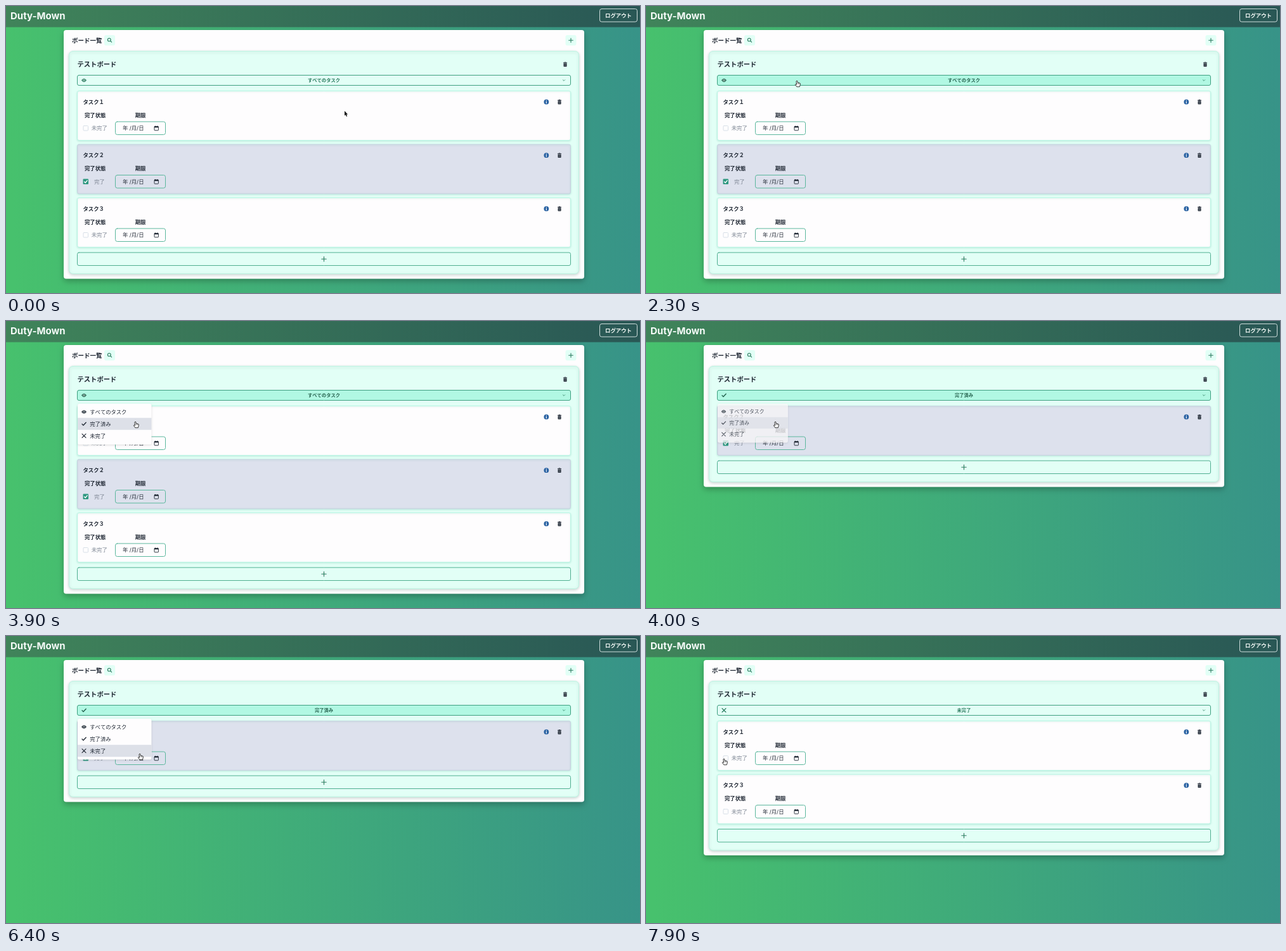
An HTML page with a canvas for the animation above (8000 ms loop, 1000x454 px).

```html
<!DOCTYPE html>
<html lang="ja">
<head>
<meta charset="utf-8">
<title>Task board</title>
<style>
html, body { margin: 0; width: 100%; height: 100%; overflow: hidden; background: #41ab78; }
canvas { display: block; width: 1000px; height: 454px; }
</style>
</head>
<body>
<canvas id="stage"></canvas>
<script>
const W = 1000, H = 454, LOOP = 8000, STEP = 100;
const canvas = document.getElementById('stage');
const ctx = canvas.getContext('2d');
const dpr = window.devicePixelRatio || 1;
canvas.width = W * dpr;
canvas.height = H * dpr;

const INK = '#1f2733', GREEN = '#2a7a5e', EDGE = '#4fae90', MINT = '#e2fff6';
const FILTERS = [
  { label: 'すべてのタスク', icon: eye },
  { label: '完了済み', icon: check },
  { label: '未完了', icon: cross }
];
const TASKS = [
  { name: 'タスク１', done: false },
  { name: 'タスク２', done: true },
  { name: 'タスク３', done: false }
];

// Pointer stops: time, x, y
const PATH = [
  [0, 534, 166], [200, 534, 166], [1400, 245, 98], [1600, 244, 99],
  [2300, 238, 118], [2700, 237, 120], [3000, 237, 122], [3600, 205, 158],
  [3900, 204, 159], [4100, 204, 159], [4800, 272, 117], [5200, 272, 117],
  [6100, 212, 185], [6400, 211, 186], [6700, 211, 186], [7700, 124, 194], [7900, 123, 194]
];
// Menu: opening and closing time, picked filter
const MENUS = [
  { open: 2650, close: 3985, pick: 1 },
  { open: 5050, close: 6485, pick: 2 }
];

const clamp = (v, a = 0, b = 1) => Math.min(b, Math.max(a, v));
const smooth = p => p * p * (3 - 2 * p);

// cubic-bezier(.4, 0, .2, 1)
function standardEase(p) {
  let lo = 0, hi = 1;
  for (let i = 0; i < 20; i++) {
    const u = (lo + hi) / 2, v = 1 - u;
    if (1.2 * v * v * u + 0.6 * v * u * u + u * u * u < p) lo = u; else hi = u;
  }
  return lo * lo * (3 - 2 * lo);
}

function pointerAt(t) {
  const i = PATH.findIndex(k => k[0] > t);
  if (i < 0) return PATH[PATH.length - 1].slice(1);
  const a = PATH[i - 1], b = PATH[i];
  const p = smooth((t - a[0]) / (b[0] - a[0]));
  return [a[1] + (b[1] - a[1]) * p, a[2] + (b[2] - a[2]) * p];
}

function menuAt(t) {
  for (const m of MENUS) {
    if (t < m.open || t >= m.close + 100) continue;
    const q = 1 - clamp((t - m.close) / 100);
    const shown = t < m.close ? standardEase(clamp((t - m.open) / 200)) : q * q * (0.6 + 0.4 * q) + 0.08 * (q > 0.5);
    return { shown: clamp(shown), pressed: t >= m.close - 100, pick: m.pick };
  }
  return null;
}

function text(str, x, cy, size, weight, color, align = 'left') {
  ctx.font = `${weight} ${size}px Inter, "Noto Sans CJK JP", "Noto Sans CJK", sans-serif`;
  ctx.textAlign = align;
  ctx.fillStyle = color;
  ctx.fillText(str, x, cy + size * 0.37);
}

function box(x, y, w, h, r, fill, stroke, line = 1) {
  ctx.beginPath();
  ctx.roundRect(x, y, w, h, r);
  if (fill) { ctx.fillStyle = fill; ctx.fill(); }
  if (stroke) { ctx.strokeStyle = stroke; ctx.lineWidth = line; ctx.stroke(); }
}

function shadowBox(color, blur, dy, ...args) {
  ctx.save();
  ctx.shadowColor = color;
  ctx.shadowBlur = blur * dpr;
  ctx.shadowOffsetY = dy * dpr;
  box(...args);
  ctx.restore();
}

function lines(color, width, ...paths) {
  ctx.strokeStyle = color;
  ctx.lineWidth = width;
  ctx.lineCap = ctx.lineJoin = 'round';
  ctx.beginPath();
  for (const p of paths)
    for (let i = 0; i < p.length; i += 2) i ? ctx.lineTo(p[i], p[i + 1]) : ctx.moveTo(p[i], p[i + 1]);
  ctx.stroke();
}

function disc(x, y, r, color) {
  ctx.fillStyle = color;
  ctx.beginPath();
  ctx.arc(x, y, r, 0, 7);
  ctx.fill();
}

function eye(x, y, color) {
  ctx.fillStyle = color;
  ctx.beginPath();
  ctx.moveTo(x - 4, y);
  ctx.quadraticCurveTo(x, y - 5.4, x + 4, y);
  ctx.quadraticCurveTo(x, y + 5.4, x - 4, y);
  ctx.fill();
  disc(x, y, 1.7, '#f0fbf7');
  disc(x, y, 1.1, color);
}

function check(x, y, color) {
  lines(color, 1.3, [x - 3, y + 0.3, x - 1, y + 2.3, x + 3.2, y - 2.2]);
}

function cross(x, y, color) {
  lines(color, 1.1, [x - 3, y - 3, x + 3, y + 3], [x + 3, y - 3, x - 3, y + 3]);
}

function plus(x, y, r, color) {
  lines(color, 1.1, [x - r, y, x + r, y], [x, y - r, x, y + r]);
}

function trash(x, y) {
  ctx.fillStyle = INK;
  ctx.fillRect(x - 3, y - 3, 6, 1.1);
  ctx.fillRect(x - 1.2, y - 3.7, 2.4, 1);
  box(x - 2.5, y - 1.5, 5, 5.3, 0.8, INK);
  lines('#a9b4ba', 0.5, [x - 0.8, y - 0.5, x - 0.8, y + 2.7], [x + 0.8, y - 0.5, x + 0.8, y + 2.7]);
}

function info(x, y) {
  disc(x, y, 3.9, '#2a62a2');
  ctx.fillStyle = '#fff';
  ctx.fillRect(x - 0.6, y - 0.6, 1.2, 3);
  disc(x, y - 1.9, 0.7, '#fff');
}

function calendar(x, y) {
  box(x - 3.2, y - 2.9, 6.4, 6.2, 0.7, null, INK, 0.9);
  ctx.fillStyle = INK;
  ctx.fillRect(x - 3.2, y - 3.1, 6.4, 1.9);
  ctx.fillRect(x - 2.3, y - 4, 1, 1.2);
  ctx.fillRect(x + 1.3, y - 4, 1, 1.2);
}

function backdrop() {
  const bg = ctx.createLinearGradient(0, 30, 1000, 0);
  bg.addColorStop(0, '#47c16d');
  bg.addColorStop(1, '#379388');
  ctx.fillStyle = bg;
  ctx.fillRect(0, 0, W, H);
  const bar = ctx.createLinearGradient(0, 0, W, 0);
  bar.addColorStop(0, '#40845a');
  bar.addColorStop(1, '#295755');
  ctx.fillStyle = bar;
  ctx.fillRect(0, 0, W, 33.5);
  text('Duty-Mown', 7, 15, 15, 700, '#f5fbf8');
  box(936.5, 4.5, 59, 20.5, 3, null, '#cfdedc');
  text('ログアウト', 966, 14.5, 8.4, 700, '#f5fbf8', 'center');
}

function panel(count) {
  const end = 212.5 + 84.5 * (count - 1);
  shadowBox('rgba(0,0,0,.25)', 10, 4, 91, 38, 821, end + 50.5 - 38 - 0.5, 4, '#fefdfe');
  text('ボード一覧', 104, 54.3, 9.5, 700, INK);
  box(155, 46, 17, 16.5, 3, MINT);
  ctx.strokeStyle = GREEN;
  ctx.lineWidth = 1.1;
  ctx.beginPath();
  ctx.arc(162.8, 53.4, 2.4, 0, 7);
  ctx.stroke();
  lines(GREEN, 1.2, [164.7, 55.3, 166.6, 57.2]);
  box(882.5, 46, 17, 16.5, 3, MINT);
  plus(891, 54.3, 3.3, GREEN);

  shadowBox('rgba(0,60,40,.2)', 4, 1.5, 99.5, 71.5, 804, end + 42 - 71.5, 6, MINT, '#bdf3e2');
  text('テストボード', 112.5, 92.2, 10.3, 700, INK);
  trash(882, 92.3);
  box(112.5, end + 8.5, 778, 20.5, 2.5, MINT, EDGE);
  plus(501.5, end + 18.8, 3.7, GREEN);
}

function filterButton(filter, lit) {
  box(112.5, 109.5, 778, 16, 2.5, lit ? '#b1f8e3' : MINT, '#3f9f80');
  filter.icon(123, 117.5, lit ? '#215f4a' : GREEN);
  text(filter.label, 501.5, 117.5, 7.25, 600, lit ? '#276450' : GREEN, 'center');
  lines(GREEN, 0.8, [878.4, 116.8, 880, 118.4, 881.6, 116.8]);
}

function card(task, y) {
  const { name, done } = task;
  shadowBox('rgba(40,150,120,.18)', 3, 1, 112.5, y, 778, 78, 2.5,
    done ? '#dde1ed' : '#fefdfe', done ? '#c5d2df' : '#b9f6e4');
  text(name, 121.5, y + 17, 8.4, 700, INK);
  info(852.3, y + 17.2);
  trash(873, y + 17.2);
  text('完了状態', 124, y + 38, 8.4, 700, INK);
  text('期限', 203.7, y + 38, 8.4, 700, INK);
  if (done) {
    box(121.5, y + 54.6, 8.5, 8.5, 1, '#2f9880');
    lines('#fff', 1.3, [123.6, y + 59, 125.2, y + 60.7, 128.2, y + 57]);
  } else {
    box(122, y + 55, 7.5, 7.5, 1, null, '#d8e0e8');
  }
  text(done ? '完了' : '未完了', done ? 139 : 134.7, y + 58.8, 8.4, 400, '#7e8794');
  box(172.5, y + 48.5, 79, 20.5, 3, null, '#5bb79d');
  text('年 /月/日', 184, y + 58.8, 8.4, 400, '#252d38');
  calendar(237.2, y + 59);
}

function menu(m, y) {
  const scale = 0.8 + 0.2 * m.shown;
  const active = clamp(Math.floor((y - 134.5) / 18.8), 0, 2);
  ctx.save();
  ctx.globalAlpha = m.shown;
  ctx.translate(113, 131);
  ctx.scale(scale, scale);
  shadowBox('rgba(0,0,0,.14)', 3, 1, 0, 0, 116.5, 64.5, 2.5, '#fefdfe');
  FILTERS.forEach((f, i) => {
    const cy = 12.8 + i * 18.9;
    if (i === active) {
      ctx.fillStyle = m.pressed ? '#dde0e8' : '#e9ecf2';
      ctx.fillRect(0, cy - 9.4, 116.5, 18.9);
    }
    f.icon(10, cy, INK);
    text(f.label, 19.3, cy, 8.3, 400, INK);
  });
  ctx.restore();
}

function arrow(x, y) {
  ctx.save();
  ctx.translate(x, y);
  ctx.beginPath();
  [[0, 0], [0, 7.6], [1.7, 6.1], [2.9, 8.9], [4.2, 8.3], [3, 5.6], [5.2, 5.4]].forEach(p => ctx.lineTo(...p));
  ctx.closePath();
  ctx.lineJoin = 'round';
  ctx.lineWidth = 1.2;
  ctx.strokeStyle = '#fff';
  ctx.stroke();
  ctx.fillStyle = '#111';
  ctx.fill();
  ctx.restore();
}

function hand(x, y) {
  ctx.save();
  ctx.translate(x, y);
  ctx.beginPath();
  ctx.moveTo(-0.9, 0.8);
  ctx.quadraticCurveTo(0, -0.6, 0.9, 0.8);
  ctx.lineTo(1.2, 3.2);
  ctx.lineTo(4.6, 3.9);
  ctx.quadraticCurveTo(5.7, 4.4, 5.3, 6.3);
  ctx.lineTo(4.3, 9.8);
  ctx.lineTo(-0.2, 9.8);
  ctx.lineTo(-2.7, 6.2);
  ctx.quadraticCurveTo(-2.6, 4.8, -0.7, 6);
  ctx.closePath();
  ctx.fillStyle = '#fff';
  ctx.fill();
  ctx.lineJoin = 'round';
  ctx.lineWidth = 0.9;
  ctx.strokeStyle = '#222';
  ctx.stroke();
  lines('#444', 0.5, [1.2, 3.4, 1.2, 5.2], [2.6, 3.8, 2.6, 5.4], [4, 4, 4, 5.6]);
  ctx.restore();
}

function draw(t) {
  const [x, y] = pointerAt(t);
  const m = menuAt(t);
  const mode = MENUS.reduce((f, k) => t >= k.close ? k.pick : f, 0);
  const tasks = TASKS.filter(k => !mode || k.done === (mode === 1));
  const onButton = x > 112 && x < 891 && y > 109 && y < 126;
  const onMenu = m && x < 230 && y >= 126 && y < 196;
  const onBox = !m && mode === 2 && x > 120 && x < 161 && y > 187 && y < 199;

  ctx.setTransform(dpr, 0, 0, dpr, 0, 0);
  backdrop();
  panel(tasks.length);
  filterButton(FILTERS[mode], onButton || m);
  tasks.forEach((k, i) => card(k, 134.5 + i * 84.5));
  if (m) menu(m, y);
  (onButton || onMenu || onBox ? hand : arrow)(x, y);
}

const start = performance.now();
function tick() {
  const t = (performance.now() - start) % LOOP;
  draw(Math.floor(t / STEP) * STEP);
  requestAnimationFrame(tick);
}
tick();
</script>
</body>
</html>
```
